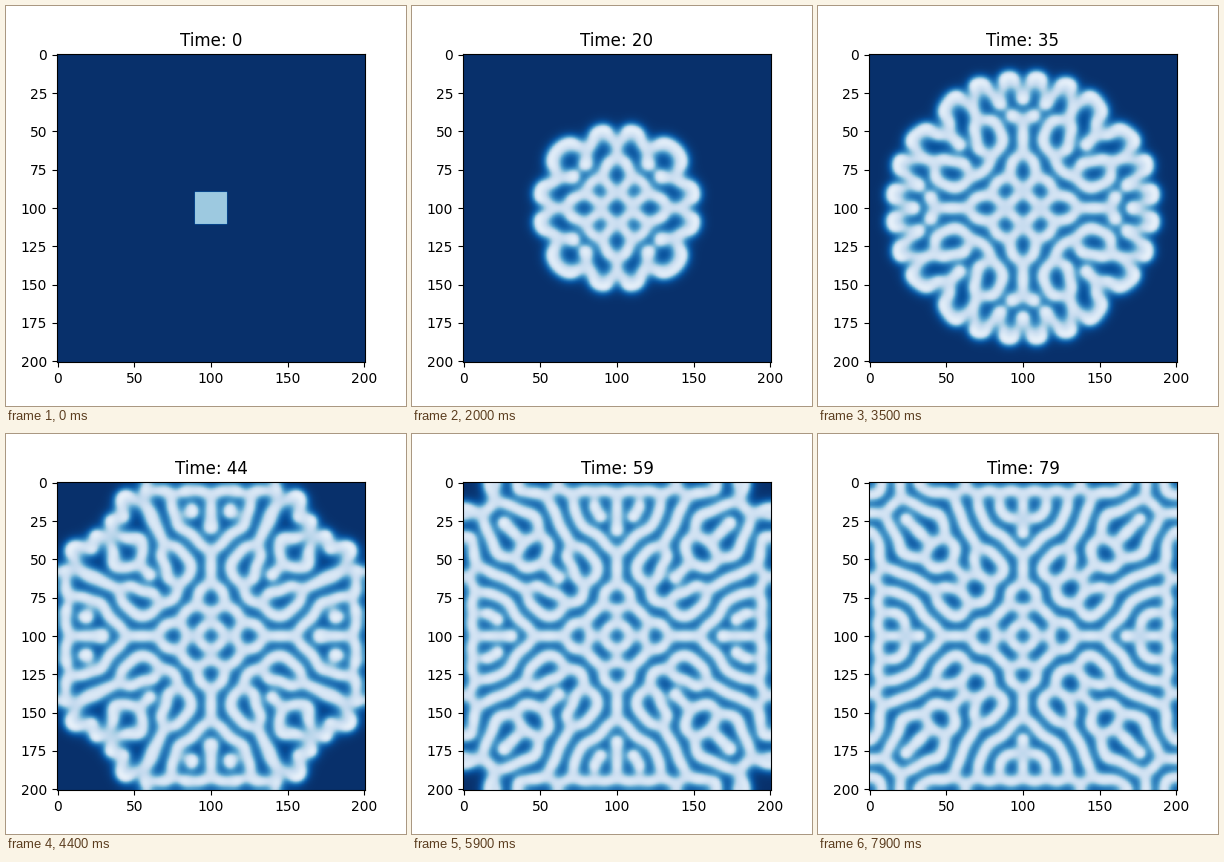
A matplotlib script for the animation above (8000 ms loop, 400x400 px).

```python
"""Gray-Scott reaction-diffusion growing from a square seed."""
import numpy as np
import matplotlib.pyplot as plt
from matplotlib.animation import FuncAnimation

HALF = 100                  # the grid has 2 * HALF + 1 cells per side
SEED = 10                   # half width of the seeded square
DU, DV = 0.2, 0.1
FEED, KILL = 0.04, 0.06
FRAMES = 80
CHUNK = 5                   # steps between stored states
REACH, REACH_TIME = 94, 35  # front distance in cells, and when it gets there
MAX_STATES = 6000


def laplacian(a):
    """Quadrant Laplacian: mirrored at the centre cell, periodic at the rim."""
    n = len(a)
    p = np.empty((n + 2, n + 2))
    p[1:-1, 1:-1] = a
    p[0, 1:-1], p[-1, 1:-1] = a[1], a[-1]
    p[1:-1, 0], p[1:-1, -1] = a[:, 1], a[:, -1]
    return p[:-2, 1:-1] + p[2:, 1:-1] + p[1:-1, :-2] + p[1:-1, 2:] - 4 * a


def evolve():
    """Yield u every CHUNK steps, for one quadrant of the symmetric field."""
    u = np.ones((HALF + 1, HALF + 1))
    v = np.zeros_like(u)
    u[:SEED + 1, :SEED + 1] = 0.5
    v[:SEED + 1, :SEED + 1] = 0.25
    while True:
        yield u.astype(np.float32)
        for _ in range(CHUNK):
            uvv = u * v * v
            du = DU * laplacian(u) - uvv + FEED * (1 - u)
            dv = DV * laplacian(v) + uvv - (FEED + KILL) * v
            u += du
            v += dv


def simulate():
    """Return one state per frame, paced by the speed of the front."""
    states, stride = [], None
    for u in evolve():
        states.append(u)
        if stride is None and (u[REACH] < 0.9).any():
            stride = max(1, round((len(states) - 1) / REACH_TIME))
        if stride and len(states) > (FRAMES - 1) * stride:
            break
        if len(states) >= MAX_STATES:
            stride = stride or MAX_STATES // FRAMES
            break
    return states[::stride][:FRAMES]


fields = simulate()
mirror = np.abs(np.arange(-HALF, HALF + 1))


def full(i):
    return fields[min(i, len(fields) - 1)][np.ix_(mirror, mirror)]


fig, ax = plt.subplots(figsize=(4, 4), dpi=100)
image = ax.imshow(full(0), cmap="Blues", vmin=0.2, vmax=1)
title = ax.set_title("Time: 0")


def update(i):
    image.set_data(full(i))
    title.set_text(f"Time: {i}")
    return image, title


anim = FuncAnimation(fig, update, frames=FRAMES, interval=100,
                     repeat=True, repeat_delay=0)
plt.show()
```
